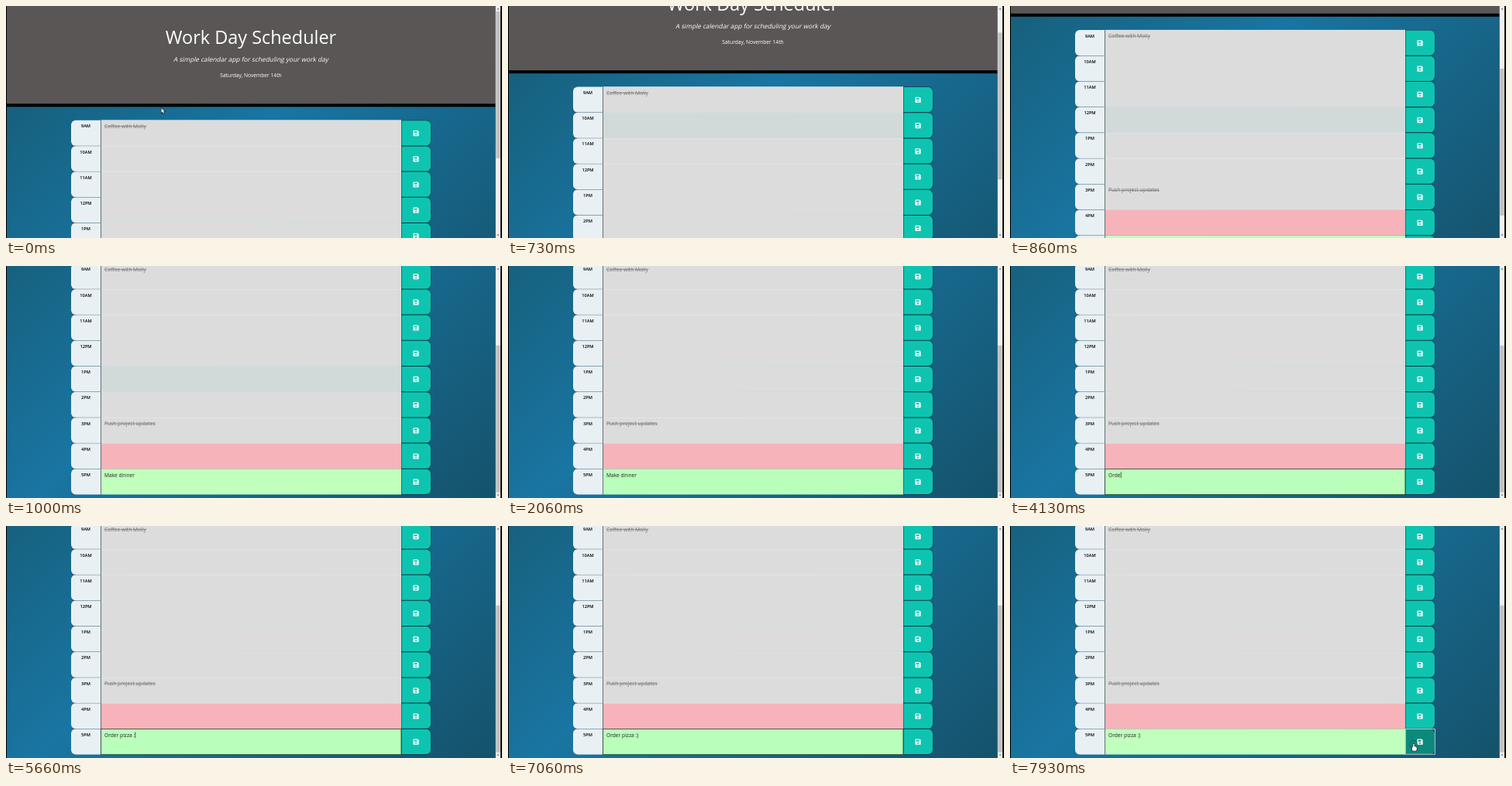
These frames come from a looping animation (640 by 300 pixels, 8000 ms). An HTML page with a canvas:

```html
<!DOCTYPE html>
<html lang="en">
<head>
<meta charset="utf-8">
<title>Work Day Scheduler</title>
<style>
  html, body { margin: 0; width: 100%; height: 100%; overflow: hidden; background: #000; }
  canvas { display: block; width: 640px; height: 300px; }
</style>
</head>
<body>
<canvas id="stage" width="640" height="300"></canvas>
<script>
const ctx = document.getElementById('stage').getContext('2d');
const LOOP = 8000;
const FONT = '"Open Sans", "Noto Sans", sans-serif';
const BODY_SIZE = 6.68;
const PAGE_W = 631.7, PAGE_H = 451, CENTER = 316;
const ROWS_TOP = 147.7, ROW_H = 33.2, ROW_COUNT = 9, LAST = ROW_COUNT - 1;
const LABEL_X = 84, AREA_X = 122.6, BTN_X = 510, BTN_END = 548;
const PAST_TEXT = { 0: 'Coffee with Molly', 6: 'Push project updates' };

const FOCUS_AT = 2130, BUTTON_AT = 7600, BLUR_AT = 7860;
const OLD_TEXT = 'Make dinner', NEW_TEXT = 'Order pizza :)';

// Evenly spaced key presses, one per character
const presses = (str, start, step) => [...str].map((_, i) => start + i * step);
const ERASE = presses(OLD_TEXT, 2460, 70);
const TYPE = [
  ...presses('Order ', 3800, 110),
  ...presses('pizza ', 4430, 180),
  ...presses(':)', 5660, 400),
];

const progress = (t, from, to) => Math.min(1, Math.max(0, (t - from) / (to - from)));
const smooth = p => p * p * (3 - 2 * p);
const countUntil = (keys, t) => keys.filter(k => k <= t).length;

const scrollAt = t => 151 * smooth(progress(t, 595, 980));
const pointerYAt = t => 132 + 18 * progress(t, 30, 330) + 122 * progress(t, 1300, 2060);

function rect(color, x, y, w, h) {
  ctx.fillStyle = color;
  ctx.fillRect(x, y, w, h);
}

function rounded(color, x, y, w, h, radii) {
  ctx.fillStyle = color;
  ctx.beginPath();
  ctx.roundRect(x, y, w, h, radii);
  ctx.fill();
}

function frame(color, x, y, w, h) {
  ctx.strokeStyle = color;
  ctx.lineWidth = 0.8;
  ctx.strokeRect(x, y, w, h);
}

function text(str, x, y, size, color, { weight = 400, align = 'left', slant = 0 } = {}) {
  ctx.save();
  ctx.font = `${weight} ${size}px ${FONT}`;
  ctx.textAlign = align;
  ctx.fillStyle = color;
  ctx.transform(1, 0, -slant, 1, x, y);
  ctx.fillText(str, 0, 0);
  const width = ctx.measureText(str).width;
  ctx.restore();
  return width;
}

function triangle(color, x, y, w, h) {
  ctx.fillStyle = color;
  ctx.beginPath();
  ctx.moveTo(x - w / 2, y);
  ctx.lineTo(x + w / 2, y);
  ctx.lineTo(x, y + h);
  ctx.fill();
}

function drawBackground(scroll) {
  // A 135 degree gradient spanning the whole page
  const cy = PAGE_H / 2 - scroll, r = (PAGE_W + PAGE_H) / 4;
  const g = ctx.createLinearGradient(CENTER - r, cy - r, CENTER + r, cy + r);
  g.addColorStop(0, '#16586f');
  g.addColorStop(0.45, '#1975a2');
  g.addColorStop(1, '#15526b');
  rect(g, 1, 0, PAGE_W - 1, 300);
}

function drawHeader(scroll) {
  rect('#5b5656', 1, -scroll, PAGE_W - 1, 126.4);
  rect('#000', 1, 126.4 - scroll, PAGE_W - 1, 4);
  const align = 'center';
  text('Work Day Scheduler', CENTER, 49.3 - scroll, 23.45, '#fff', { align });
  text('A simple calendar app for scheduling your work day', CENTER, 72 - scroll, 8.31, '#fff',
    { align, slant: 0.21 });
  text('Saturday, November 14th', CENTER, 92 - scroll, BODY_SIZE, '#fff', { align });
}

function drawSaveIcon(cx, cy, hole) {
  const r = 3.6;
  rounded('#fff', cx - r, cy - r, 2 * r, 2 * r, [0.6, 2, 0.6, 0.6]);
  rect(hole, cx - 2.5, cy - 2.5, 4.1, 2);
  rounded(hole, cx - 1.05, cy + 0.55, 2.1, 2.1, 1.05);
}

function hourLabel(i) {
  const hour = 9 + i;
  return hour < 12 ? `${hour}AM` : `${(hour - 1) % 12 + 1}PM`;
}

function areaColor(i, hovered) {
  if (i === LAST) return hovered ? '#b9ffbb' : '#c0ffbc';
  if (i === LAST - 1) return '#f7b3ba';
  return hovered ? '#d2d9d9' : '#dcdcdc';
}

function buttonColor(hover) {
  const fade = (from, to) => Math.round(from + (to - from) * hover);
  return `rgb(${fade(14, 11)}, ${fade(196, 138)}, ${fade(176, 124)})`;
}

function entryText(t) {
  const typed = countUntil(TYPE, t);
  if (typed) return NEW_TEXT.slice(0, typed);
  return OLD_TEXT.slice(0, OLD_TEXT.length - countUntil(ERASE, t));
}

function caretOn(t) {
  const lastKey = Math.max(FOCUS_AT, ...[...ERASE, ...TYPE].filter(k => k <= t));
  return Math.floor((t - lastKey) / 530) % 2 === 0;
}

function drawButton(y, color, clicked) {
  const w = BTN_END - BTN_X;
  rounded('#0e2c33', BTN_X, y, w + 0.4, ROW_H, [0, 6, 6, 0]);
  rounded(color, BTN_X + 0.5, y + 0.5, w - 0.5, ROW_H - 1, [0, 5.6, 5.6, 0]);
  if (clicked) frame('#dfe9e8', BTN_X + 0.3, y + 0.3, w, ROW_H - 0.6);
  drawSaveIcon(529, y + 16.9, color);
}

function drawEntry(t, y) {
  const w = text(entryText(t), 127, y + 10.2, BODY_SIZE, '#222');
  if (t < FOCUS_AT || t >= BLUR_AT) return;
  if (caretOn(t)) rect('#222', 127.2 + w, y + 4, 0.7, 7.8);
  frame('#2b4a33', 122.5, Math.floor(y) + 0.5, BTN_X - AREA_X, ROW_H - 0.2);
}

function drawRow(i, t, y, hovered) {
  const areaW = BTN_X - AREA_X;
  rounded('#e8f0f4', LABEL_X, y, AREA_X - LABEL_X, ROW_H, [6, 0, 0, 6]);
  if (i) rect('rgba(30,50,60,.6)', LABEL_X + 4, y - 0.2, AREA_X - LABEL_X - 4, 0.5);
  text(hourLabel(i), 103, y + 9.6, 5.65, '#000', { weight: 600, align: 'center' });

  rect(areaColor(i, hovered), AREA_X, y, areaW, ROW_H);
  if (i < LAST) rect('rgba(255,255,255,.75)', AREA_X, y - 0.2, areaW, 0.6);
  rect('#333', AREA_X - 0.4, y, 0.6, ROW_H);

  const last = i === LAST;
  const hover = last ? progress(t, BUTTON_AT, BUTTON_AT + 150) : 0;
  drawButton(y, buttonColor(hover), last && t >= BLUR_AT);

  if (PAST_TEXT[i]) {
    const w = text(PAST_TEXT[i], 127, y + 10.2, BODY_SIZE, '#757575');
    rect('#757575', 127, y + 7.7, w, 0.7);
  }
  if (last) drawEntry(t, y);
}

function drawScrollbar(scroll) {
  rect('#f1f1f1', PAGE_W, 0, 638 - PAGE_W, 300);
  rect('#c1c1c1', 632.3, 7 + scroll * 286 / PAGE_H, 5.4, 190);
  triangle('#555', 635, 4.4, 2.8, -1.6);
  triangle('#555', 635, 295.6, 2.8, 1.6);
}

// Strokes first so that the fill hides the inner edges
function outlined(path) {
  ctx.strokeStyle = '#111';
  ctx.lineWidth = 1.2;
  ctx.stroke(path);
  ctx.fillStyle = '#fff';
  ctx.fill(path);
}

function drawArrow(x, y) {
  outlined(new Path2D(`M${x} ${y}v6l1.5 -1.2l1 2.2l1 -.4l-1 -2.2h1.8z`));
}

function drawHand(x, y) {
  const hand = new Path2D();
  hand.roundRect(x - 0.8, y, 1.5, 6, 0.7);
  hand.roundRect(x - 2.2, y + 3.8, 6, 5.4, 1.6);
  outlined(hand);
}

function drawPointer(t, y) {
  if (y < ROWS_TOP) drawArrow(200.5, y);
  if (t < BUTTON_AT) return;
  const p = progress(t, BUTTON_AT, BLUR_AT);
  const x = 512 + 9 * p, top = 276 + 5.5 * p;
  if (t >= BLUR_AT) {
    ctx.strokeStyle = 'rgba(20,50,50,.7)';
    ctx.lineWidth = 0.6;
    ctx.beginPath();
    ctx.arc(x - 0.5, top + 1, 5, 0, Math.PI * 2);
    ctx.stroke();
  }
  drawHand(x, top);
}

function draw(t) {
  const scroll = scrollAt(t), pointerY = pointerYAt(t);
  const rowsY = ROWS_TOP - scroll;
  const hoverRow = t < BUTTON_AT ? Math.floor((pointerY - rowsY) / ROW_H) : -1;

  rect('#000', 0, 0, 640, 300);
  drawBackground(scroll);
  drawHeader(scroll);
  for (let i = 0; i < ROW_COUNT; i++) drawRow(i, t, rowsY + i * ROW_H, i === hoverRow);
  drawScrollbar(scroll);
  drawPointer(t, pointerY);
}

const start = performance.now();
function tick() {
  draw((performance.now() - start) % LOOP);
  requestAnimationFrame(tick);
}
tick();
</script>
</body>
</html>
```
